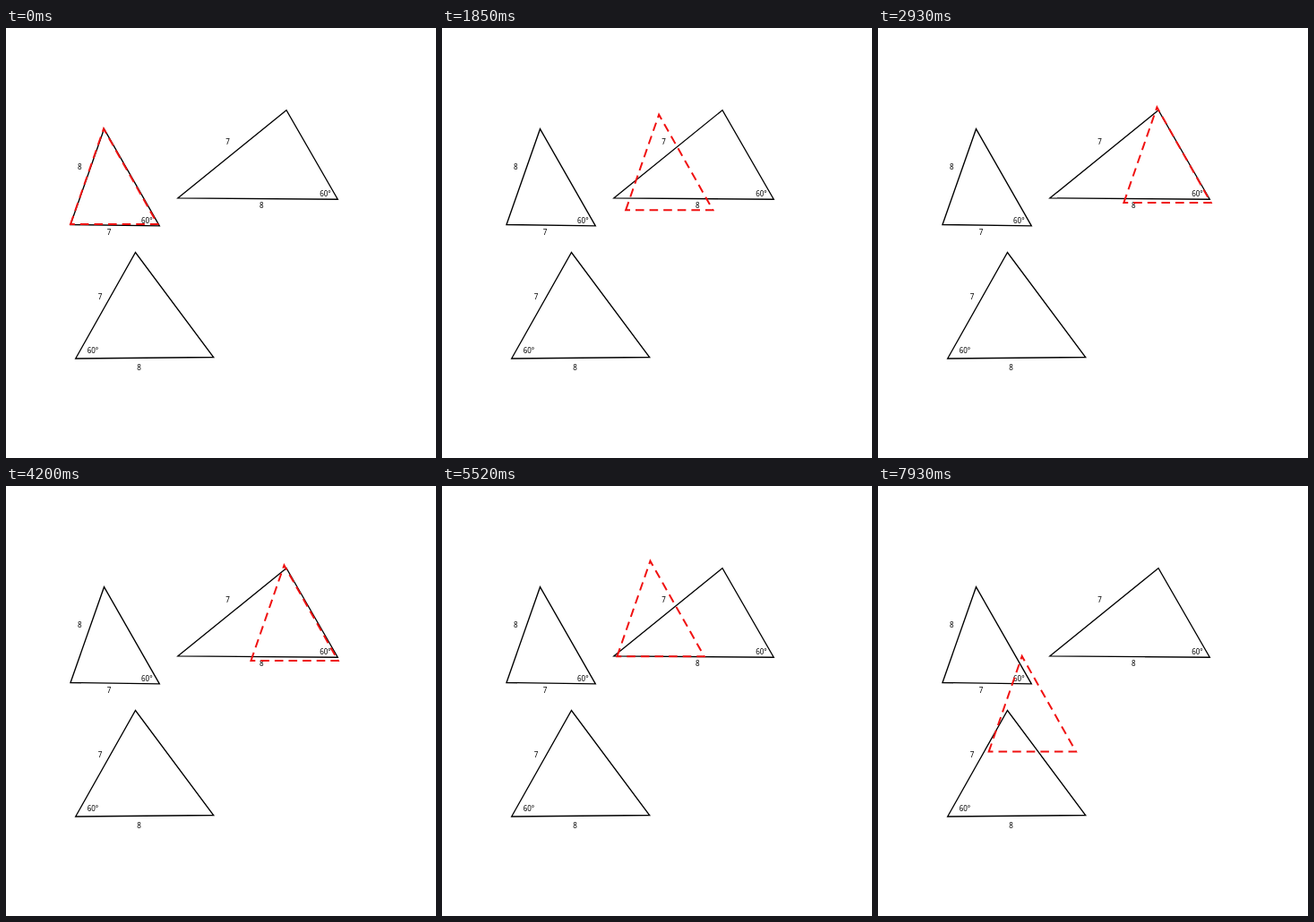
Animation of 480 by 480 pixels, one loop 7.99 s. Source, as an HTML page:

```html
<!DOCTYPE html>
<html lang="en">
<head>
<meta charset="utf-8">
<title>Sliding triangle</title>
<style>
  html, body { margin: 0; height: 100%; overflow: hidden; background: #fff; }
  svg { display: block; width: 100vw; height: 100vh; }
  path { fill: none; stroke: #000; stroke-width: 1.35; }
  #mover { stroke: #f01010; stroke-width: 2; stroke-dasharray: 9.6 6; }
  text { font: 8px "Noto Sans", "Open Sans", sans-serif; text-anchor: middle; }
</style>
</head>
<body>
<svg viewBox="0 0 480 480">
  <path d="M72 219.5 L109.5 112.7 L171.3 220.8 Z"/>
  <path d="M192 189.8 L313 91.7 L370.3 191.2 Z"/>
  <path d="M77.7 369 L144.5 250.5 L231.7 367.5 Z"/>
  <text x="82.3" y="158">8</text>
  <text x="115" y="230.7">7</text>
  <text x="157.3" y="217.8">60°</text>
  <text x="247.5" y="130">7</text>
  <text x="285.3" y="201">8</text>
  <text x="356.5" y="188">60°</text>
  <text x="105" y="303">7</text>
  <text x="97" y="363">60°</text>
  <text x="148.5" y="382">8</text>
  <path id="mover" d="M0 0 L37 -106.5 L97.3 0 Z"/>
</svg>
<script>
  const LOOP = 7990, STEP = 60, STEPS = 31;
  const starts = [1130, 4200, 7270];
  // Resting places of the lower left corner
  const stops = [[72, 219], [274.4, 195], [191.8, 190], [78, 368]];
  const mover = document.getElementById("mover");

  const bezier = (a, b, t) =>
    3 * a * (1 - t) ** 2 * t + 3 * b * (1 - t) * t * t + t ** 3;

  function ease(x) {
    let lo = 0, hi = 1;
    for (let i = 0; i < 24; i++) {
      const mid = (lo + hi) / 2;
      if (bezier(0.37, 0.25, mid) < x) lo = mid; else hi = mid;
    }
    return bezier(0.1, 1, lo);
  }

  function place(t) {
    let [x, y] = stops[0];
    starts.forEach((start, i) => {
      if (t < start) return;
      const step = Math.min(STEPS, Math.floor((t - start) / STEP) + 1);
      const p = ease(step / STEPS);
      const [from, to] = [stops[i], stops[i + 1]];
      x = from[0] + (to[0] - from[0]) * p;
      y = from[1] + (to[1] - from[1]) * p;
    });
    mover.setAttribute("transform", `translate(${x} ${y})`);
  }

  const origin = performance.now();
  function frame() {
    place((performance.now() - origin) % LOOP);
    requestAnimationFrame(frame);
  }
  frame();
</script>
</body>
</html>
```
